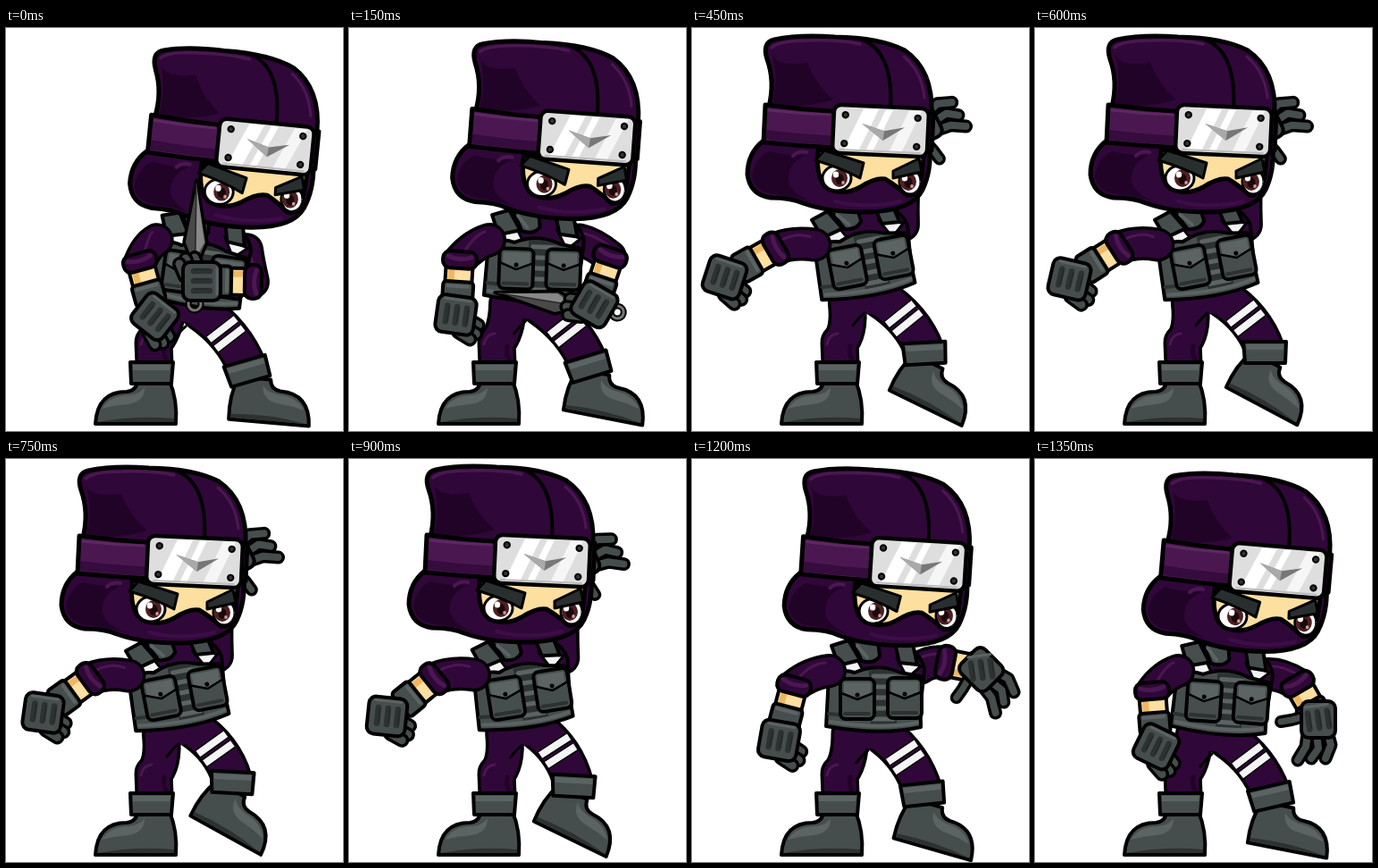
Recreate the animation shown at these times as an HTML page with a canvas. Size 377x451 px, loop 1.5 s.

```html
<!DOCTYPE html>
<html lang="en">
<head>
<meta charset="utf-8">
<title>Ninja throw</title>
<style>
html, body { margin: 0; width: 100%; height: 100%; overflow: hidden; background: #fff; }
canvas { display: block; }
</style>
</head>
<body>
<canvas id="stage" width="377" height="451"></canvas>
<script>
const ctx = document.getElementById('stage').getContext('2d');
const STEP = 150, COUNT = 10;
const INK = '#000', PURPLE = '#300739', LIGHT = '#4b1751', DARK = '#210328';
const GREY = '#464e4d', PALE = '#5c6463', SHADE = '#2c3231', SKIN = '#fddf9f', WHITE = '#f4f4f4';

// One row per step.
// x, y, turn
const HEAD = [
  [290, 132, 3], [266, 122, 1.6], [239, 115, .5], [211, 114, 0], [211, 114, 0],
  [211, 114, 0], [216, 113, 0], [231, 114, .3], [253, 117, 1], [272, 124, 2.2]
];
const TORSO = [
  [222, 275, 8], [214, 269, 2], [208, 266, -3], [200, 261, -11], [200, 261, -11],
  [200, 261, -11], [202, 262, -9], [206, 263, -5], [212, 267, 0], [216, 271, 4]
];
// ankle x, y, foot turn, cuff x, y, cuff turn
const FOOT = [
  [278, 395, 5, 270, 384, -16], [273, 388, 11, 268, 379, -17], [269, 383, 18, 265, 367, -7],
  [263, 376, 26, 260, 364, -3], [257, 374, 28, 257, 363, 0], [250, 372, 29, 253, 362, 3],
  [249, 376, 26, 251, 366, 3], [252, 382, 21, 252, 371, 2], [262, 388, 16, 258, 375, -6],
  [271, 390, 11, 264, 378, -13]
];
// elbow x, y, hand x, y, hand turn
const FRONT = [
  [150, 262, 167, 323, 38], [124, 260, 120, 321, 8], [104, 250, 74, 306, 0], [93, 247, 37, 279, 18],
  [94, 246, 39, 281, 13], [94, 246, 42, 284, 8], [95, 246, 43, 288, 6], [98, 246, 70, 303, 0],
  [114, 254, 98, 315, 10], [131, 260, 136, 322, 26]
];
const BACK = [
  [276, 284, 219, 283, 90], [292, 256, 274, 309, 30], [276, 208, 333, 224, 8], [238, 160, 256, 110, -117],
  [237, 160, 254, 110, -117], [237, 160, 254, 110, -117], [240, 165, 257, 114, -113], [262, 205, 317, 168, -94],
  [284, 228, 324, 236, -45], [294, 252, 317, 292, 0]
];
// tip x, y, ring x, y while the knife is held
const KNIFE = [[213, 170, 211, 311], [163, 296, 300, 318], [309, 345, 344, 203]];

const rad = deg => deg * Math.PI / 180;

function at(x, y, deg, paint, flip = 1) {
  ctx.save();
  ctx.translate(x, y);
  ctx.rotate(rad(deg));
  ctx.scale(flip, 1);
  paint();
  ctx.restore();
}

function shape(d, fill, width = 4) {
  const path = new Path2D(d);
  if (fill) { ctx.fillStyle = fill; ctx.fill(path); }
  if (width) { ctx.strokeStyle = INK; ctx.lineWidth = width; ctx.stroke(path); }
}

function box(x, y, w, h, r, fill, width = 4) {
  ctx.beginPath();
  ctx.roundRect(x, y, w, h, r);
  ctx.fillStyle = fill;
  ctx.fill();
  if (width) { ctx.strokeStyle = INK; ctx.lineWidth = width; ctx.stroke(); }
}

function disc(x, y, rx, ry, fill, width = 0) {
  ctx.beginPath();
  ctx.ellipse(x, y, rx, ry, 0, 0, 7);
  ctx.fillStyle = fill;
  ctx.fill();
  if (width) { ctx.strokeStyle = INK; ctx.lineWidth = width; ctx.stroke(); }
}

function line(d, color, width, cap = 'round') {
  ctx.lineCap = cap;
  ctx.lineWidth = width;
  ctx.strokeStyle = color;
  ctx.stroke(new Path2D(d));
  ctx.lineCap = 'round';
}

function limb(d, width, fill) {
  line(d, INK, width + 7);
  line(d, fill, width);
}

// Point on the torso, in stage coordinates.
function onTorso(step, x, y) {
  const [cx, cy, deg] = TORSO[step], c = Math.cos(rad(deg)), s = Math.sin(rad(deg));
  return [cx + x * c - y * s, cy + x * s + y * c];
}

function boot() {
  shape('M-18,-3 Q-19,8 -30,9 Q-63,9 -65,45 L25,45 Q27,18 18,-3Z', GREY);
  shape('M-58,28 Q-48,13 -27,13 Q-14,11 -10,4 Q-10,21 -29,23 Q-44,24 -58,28Z', PALE, 0);
  shape('M-62,43 Q-20,35 23,39 L23,43Z', SHADE, 0);
}

function bootCuff() {
  shape('M-24,-12 L24,-12 L22,12 L-23,12Z', GREY);
  shape('M-21,-9 L21,-9 L20,-3 L-21,-3Z', PALE, 0);
}

function legs(step) {
  const [ax, ay, turn, cx, cy, cuffTurn] = FOOT[step];
  const [lx, ly] = onTorso(step, -35, 40), [rx, ry] = onTorso(step, 2, 42);
  const kx = (rx + cx) / 2 + 11, ky = (ry + cy) / 2 - 8;
  const left = `M${lx},${ly} Q177,340 165,352 L166,376`;
  const right = `M${rx},${ry} Q${kx},${ky} ${cx},${cy - 3}`;
  line(left, INK, 43);
  line(right, INK, 46);
  line(left, PURPLE, 36);
  line(`M${lx + 4},${ly} L${rx},${ry}`, PURPLE, 32);
  line(right, PURPLE, 39);
  line('M151,354 Q153,343 163,342', LIGHT, 3);
  line('M177,356 Q175,366 180,372', DARK, 5);
  line(`M${rx - 17},${ry + 17} Q${rx - 23},${ry + 22} ${rx - 30},${ry + 31}`, INK, 3);

  const t = .43, a = (1 - t) ** 2, b = 2 * t * (1 - t), c = t * t;
  const deg = Math.atan2(cy - ry, cx - rx) * 180 / Math.PI;
  at(a * rx + b * kx + c * cx, a * ry + b * ky + c * cy, deg, () => {
    for (const x of [-6, 7]) {
      line(`M${x},-19 L${x},19`, INK, 11, 'butt');
      line(`M${x},-19 L${x},19`, WHITE, 8, 'butt');
    }
  });

  at(165, 398, 0, boot);
  at(163, 386, 0, bootCuff);
  at(ax, ay, turn, boot, -1);
  at(cx, cy, cuffTurn, bootCuff, -1);
}

function pouch(x, y) {
  box(x - 19, y - 22, 38, 45, 6, GREY);
  shape(`M${x - 15},${y - 18} h30 v12 l-15,6 l-15,-6Z`, PALE, 0);
  line(`M${x - 18},${y - 6} L${x},${y + 1} L${x + 18},${y - 6}`, INK, 2.5);
  disc(x, y - 4, 2.5, 2.5, INK);
  line(`M${x - 14},${y + 17} h27`, SHADE, 4);
}

function torso() {
  shape('M-58,-34 Q-48,-64 0,-66 Q42,-60 48,-32 L42,25 L-56,25Z', PURPLE);
  shape('M-52,-33 L-29,-46 L-19,-27 L-32,-22Z', WHITE, 3);
  shape('M17,-44 L44,-35 L29,-22Z', WHITE, 3);
  shape('M-59,-25 Q-46,-33 -30,-28 Q-5,-39 21,-28 L43,-24 L44,33 Q0,43 -62,32Z', GREY);
  shape('M-14,-30 Q1,-34 15,-28 L17,29 L-12,30Z', SHADE, 0);
  for (let y = -24; y < 25; y += 12) line(`M-9,${y} L13,${y}`, PALE, 5);
  line('M-57,27 Q0,36 40,28', PALE, 4);
  line('M-59,18 L-40,20', SHADE, 4);
  shape('M-56,-58 L-37,-64 L-24,-42 L-48,-36Z', GREY);
  shape('M-33,-64 L-4,-64 L-2,-46 Q-9,-37 -22,-41Z', GREY);
  shape('M15,-61 L35,-60 L40,-37 L20,-39Z', GREY);
  line('M-27,-58 L-16,-45', PALE, 4);
  pouch(-27, 1);
  pouch(26, 0);
}

function slots() {
  for (const x of [-11, 0, 11]) {
    line(`M${x},-9 L${x},9`, SHADE, 6.5);
    line(`M${x + 2},-8 L${x + 2},8`, '#232827', 1.5);
  }
}

function fist() {
  for (const [x, y] of [[26, 8], [25, 18], [19, 25]])
    limb(`M${x - 14},${y - 6} L${x},${y}`, 9, GREY);
  box(-22, -21, 43, 42, 8, GREY);
  line('M-15,-17 L14,-17', PALE, 3);
  slots();
}

function openHand(deg) {
  limb('M-15,-4 L-30,0 L-42,2', 7, GREY);
  limb('M-12,15 L-14,30 L-23,45', 8, GREY);
  limb('M-2,16 L0,32 L-8,43', 8, GREY);
  limb('M10,13 L14,28 L8,43', 8, GREY);
  box(-19, -21, 38, 41, 8, GREY);
  ctx.rotate(rad(-deg - 8));
  line('M-13,-16 L12,-16', PALE, 3);
  slots();
}

function forearm([ex, ey, hx, hy], hand) {
  const deg = Math.atan2(hy - ey, hx - ex) * 180 / Math.PI - 90;
  at(ex, ey, deg, () => {
    box(-15, 2, 30, 34, 3, SKIN);
    box(-12, 8, 7, 22, 2, '#efb663', 0);
    box(-19, -10, 38, 19, 8, PURPLE);
    line('M-13,-4 Q0,1 13,-4', LIGHT, 5);
    box(-17, 24, 34, 24, 4, GREY);
    line('M-12,29 L11,29', PALE, 4);
  });
  hand();
}

function upperArm(sx, sy, [ex, ey], lit) {
  limb(`M${sx},${sy} Q${(sx + ex) / 2 - 2},${(sy + ey) / 2 - 6} ${ex},${ey}`, 31, PURPLE);
  if (lit) line(`M${sx - 5},${sy - 9} Q${(sx + ex) / 2},${(sy + ey) / 2 - 17} ${ex + 4},${ey - 8}`, LIGHT, 3);
}

function knife([tx, ty, rx, ry]) {
  const deg = Math.atan2(ry - ty, rx - tx) * 180 / Math.PI;
  at(tx, ty, deg, () => {
    ctx.beginPath();
    ctx.arc(139, 0, 7, 0, 7);
    ctx.lineWidth = 7;
    ctx.strokeStyle = INK;
    ctx.stroke();
    ctx.lineWidth = 3;
    ctx.strokeStyle = '#777';
    ctx.stroke();
    box(88, -4, 42, 8, 2, '#a11418', 3);
    shape('M0,0 L70,-13 L92,-4 L92,4 L70,13Z', '#494949', 3.5);
    shape('M4,0 L70,-10 L88,0Z', '#888', 0);
    line('M4,0 L88,0', '#262626', 1.5);
  });
}

function backForearm(step) {
  const row = BACK[step], [, , hx, hy, deg] = row;
  const held = KNIFE[step];
  if (held) knife(held);
  forearm(row, () => held
    ? at(hx, hy, deg, fist, -1)
    : at(hx, hy, deg, () => openHand(deg)));
}

function plate() {
  box(-53, -27, 106, 54, 8, '#dedede', 4.5);
  shape('M-20,-24 L-3,-24 L-24,24 L-41,24Z', '#fff', 0);
  shape('M5,-24 L13,-24 L-8,24 L-16,24Z', '#fff', 0);
  shape('M31,-24 L45,-24 L24,24 L10,24Z', '#f6f6f6', 0);
  line('M-45,23 L45,23', '#bcbcbc', 2);
  shape('M-21,-7 L4,0 L27,-5 L3,11Z', '#777', 0);
  shape('M-21,-7 L4,0 L3,11Z', '#a9a9a9', 0);
  for (const x of [-40, 41]) for (const y of [-16, 16]) disc(x, y, 3.2, 3.2, '#333', 2);
}

function eye(x, y, rx, look) {
  disc(x, y, rx, 14, '#fff', 3);
  disc(x + look, y, 9, 10, '#4d2023');
  disc(x + look, y + 1, 4.5, 6, '#1c080a');
  disc(x + look - 4, y - 4, 3.2, 3.5, '#fff');
  disc(x + look + 4, y + 5, 1.8, 2, '#c99');
}

// Drawn in the coordinates of the pose with the plate at 211, 114.
function head() {
  ctx.translate(-211, -114);
  shape('M80,126 Q62,140 62,164 Q65,187 88,190 Q111,190 124,196 Q155,207 199,206 Q247,204 258,181 Q268,160 266,132Z', PURPLE, 5);
  shape('M67,166 Q70,146 86,138 Q103,143 128,142 Q106,151 108,172 Q112,187 140,197 Q118,188 91,186 Q70,183 67,166Z', DARK, 0);
  line('M113,143 Q119,137 128,139', LIGHT, 4);

  shape('M141,137 Q138,170 152,180 Q170,188 188,178 Q205,167 216,169 Q228,176 240,187 Q253,190 257,165 L260,136Z', SKIN, 5);
  ctx.save();
  ctx.clip(new Path2D('M141,137 Q138,170 152,180 Q170,188 188,178 Q205,167 216,169 Q228,176 240,187 Q253,190 257,165 L260,136Z'));
  eye(162, 168, 16, 3);
  eye(244, 172, 12, -2);
  ctx.restore();
  shape('M138,148 L148,137 L192,151 L188,168 Q168,157 138,148Z', '#292e2e', 3);
  shape('M225,168 L225,160 L254,146 L257,161Z', '#292e2e', 3);
  line('M160,194 Q195,203 233,194', '#3d0d47', 4);

  shape('M86,88 Q93,60 84,35 Q78,16 92,13 Q119,7 160,10 Q211,11 238,25 Q270,47 268,96 L266,110 L86,108Z', PURPLE, 5);
  shape('M90,30 Q96,44 129,39 Q138,63 158,80 Q130,90 90,86 Q97,60 90,30Z', DARK, 0);
  line('M89,22 Q97,14 131,14 Q165,13 188,18', LIGHT, 3.5);
  line('M237,32 Q257,49 260,78', LIGHT, 3);
  line('M188,12 Q226,25 222,92', INK, 4);

  shape('M82,86 Q175,98 270,95 L268,137 Q170,137 80,128Z', LIGHT, 5);
  shape('M83,114 Q160,124 266,122 L265,134 Q170,134 83,125Z', '#360b3d', 0);
  line('M86,92 Q120,96 154,97', '#5d2862', 3);
  at(211, 115, 2.6, plate);
}

function draw(step) {
  ctx.fillStyle = '#fff';
  ctx.fillRect(0, 0, 377, 451);
  ctx.lineJoin = 'round';
  ctx.lineCap = 'round';
  const behind = step > 1 && step < 8;
  const [bx, by] = onTorso(step, 43, -33), [fx, fy] = onTorso(step, -58, -30);

  upperArm(bx, by, BACK[step], !behind);
  if (behind) backForearm(step);
  legs(step);
  at(...TORSO[step], torso);
  upperArm(fx, fy, FRONT[step], true);
  at(...HEAD[step], head);
  if (!behind) backForearm(step);
  const [, , hx, hy, turn] = FRONT[step];
  forearm(FRONT[step], () => at(hx, hy, turn, fist));
}

function tick() {
  draw(Math.floor(performance.now() / STEP) % COUNT);
  requestAnimationFrame(tick);
}
tick();
</script>
</body>
</html>
```
